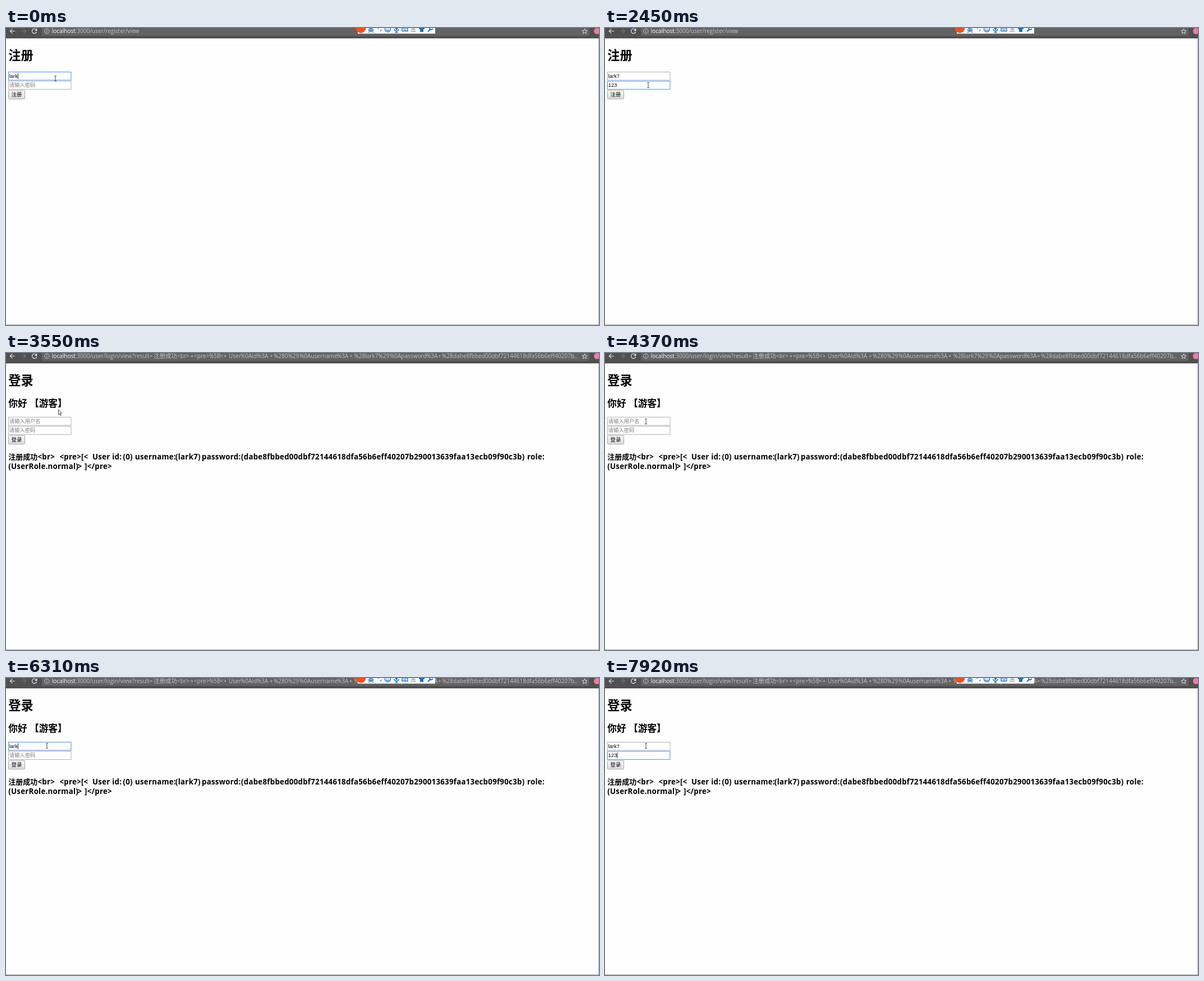
Recreate the animation shown at these times as an HTML page. Size 1057 px wide and 530 px high, loop 8000 ms.

```html
<!DOCTYPE html>
<html lang="zh-CN">
<head>
<meta charset="utf-8">
<title>注册</title>
<style>
html, body { margin: 0; width: 100%; height: 100%; overflow: hidden; background: #fefefe; }
svg { display: block; }
text { white-space: pre; }
.cjk { font-family: "Noto Sans CJK SC", "Noto Sans CJK", sans-serif; }
.url { font: 10.05px "Open Sans", sans-serif; fill: #c4c4c4; }
.url .cjk { font-size: 10.5px; }
.field { font: 9.3px "Liberation Sans", Arial, sans-serif; fill: #000; }
.hint { font-size: 9.3px; fill: #7c7c7c; }
.btn { font-size: 9.4px; fill: #000; }
.head { font-weight: 700; fill: #000; }
.result { font: 700 13.3px "Open Sans", sans-serif; letter-spacing: .25px; }
.line { fill: none; stroke-width: 1.2; }
</style>
</head>
<body>
<svg id="stage" width="1057" height="530" viewBox="0 0 1057 530">
  <defs>
    <linearGradient id="face" x1="0" y1="0" x2="0" y2="1">
      <stop offset="0" stop-color="#f7f7f7"/><stop offset="1" stop-color="#dcdcdc"/>
    </linearGradient>
    <linearGradient id="pressed" x1="0" y1="0" x2="0" y2="1">
      <stop offset="0" stop-color="#d4d4d4"/><stop offset="1" stop-color="#ededed"/>
    </linearGradient>
  </defs>
  <rect width="1057" height="530" fill="#fefefe"/>

  <g id="toolbar">
    <rect width="1057" height="18" fill="#505050"/>
    <rect y="17" width="1057" height="1.4" fill="#3c3c3c"/>
    <path d="M64 0H1040V12.5Q1040 14 1038.500 14H65.500Q64 14 64 12.500Z" fill="#636363"/>
    <path class="line" stroke="#e6e6e6" d="M16 5.500H7.500M11.500 1.300L7.300 5.500L11.500 9.700"/>
    <path class="line" stroke="#757575" d="M26.500 5.500H35M31 1.300L35.200 5.500L31 9.700"/>
    <g id="reload">
      <path class="line" stroke="#e6e6e6" d="M53.600 2.800A4.100 4.100 0 1 0 54.600 6.500"/>
      <path fill="#e6e6e6" d="M55.400 .6V5H51Z"/>
    </g>
    <path id="stop" class="line" stroke="#f0f0f0" d="M46.700 1.700L54.300 9.300M54.300 1.700L46.700 9.300"/>
    <circle class="line" cx="72.800" cy="5.700" r="4.200" stroke="#c8c8c8" style="stroke-width:1"/>
    <path d="M72.800 5V8.200M72.800 3.200V4.200" stroke="#c8c8c8"/>
    <g id="address" class="url"></g>
    <path class="line" style="stroke-width:1" stroke="#dedede" d="M1031.500 1.300L1032.800 4.400L1036 4.600L1033.600 6.700L1034.400 9.900L1031.500 8.100L1028.600 9.900L1029.400 6.700L1027 4.600L1030.200 4.400Z"/>
    <circle cx="1053.500" cy="5.500" r="5.500" fill="#ee7d9f"/>
  </g>

  <g id="ime">
    <rect x="627" width="138" height="10" fill="#fbfdff"/>
    <circle cx="632.500" cy="0" r="9" fill="#f4501c"/>
    <text class="cjk" x="645" y="6.500" font-size="11" font-weight="700" fill="#1c70c4">英</text>
    <g fill="none" stroke="#1c70c4" stroke-width="1.400">
      <path d="M663.500 0V1.500M668.800 2.800Q669 4.500 667.200 5.800"/>
      <circle cx="680.500" cy="2" r="5"/>
      <path d="M677.800 3Q680.500 6 683.200 3M678.700 0V1M682.300 0V1"/>
      <path d="M692 1.500Q692 5.300 696 5.300T700 1.500M696 5.300V8M693.500 8H698.500"/>
      <rect x="706" y="-3" width="10" height="8.500"/>
      <path d="M707 1H715M708.500 3.500H713.500" stroke-width="1.100"/>
      <path d="M752 6.500L757 1.500" stroke-width="2.200"/>
      <path d="M756 -1.500A2.700 2.700 0 1 0 760.500 1" stroke-width="1.800"/>
    </g>
    <rect x="694" y="-4" width="4" height="7.500" rx="2" fill="#1c70c4"/>
    <path d="M723.500 0H728.500V2H730V4H722V2H723.500ZM721.500 5H730.500V7H721.500Z" fill="#b7bdc4"/>
    <path d="M736 -2H746V2H744V7H738V2H736Z" fill="#1c70c4"/>
  </g>

  <g id="page"></g>

  <path d="M1056.500 18V530M0 529.500H1057" stroke="#a9a9a9"/>
  <path id="beam" d="M-2 -4.500H-.6L0 -4L.6 -4.500H2M0 -4V4M-2 4.500H-.6L0 4L.6 4.500H2" fill="none" stroke="#333" stroke-width=".9"/>
  <path id="arrow" d="M.5 .5V9.300L2.500 7.500L3.900 10.900L5.300 10.300L3.900 7.100H6.300Z" fill="#fff" stroke="#222" stroke-width=".8"/>
</svg>
<script>
const LOOP = 8000;
const USER = "lark7", PASS = "123";
const HASH = "dabe8fbbed00dbf72144618dfa56b6eff40207b290013639faa13ecb09f90c3b";
const $ = id => document.getElementById(id);

// latest value of a [time, value...] list
const at = (list, t) => list.reduce((last, row) => row[0] <= t ? row : last);

function make(parent, tag, attrs, content = "") {
  const el = document.createElementNS("http://www.w3.org/2000/svg", tag);
  for (const k in attrs) el.setAttribute(k, attrs[k]);
  el.textContent = content;
  parent.append(el);
  return el;
}
const write = (g, x, y, s, cls = "", size) =>
  make(g, "text", { x, y, class: cls, ...(size && { "font-size": size }) }, s);
const show = (el, on) => el.setAttribute("visibility", on ? "inherit" : "hidden");

function makeField(g, y, hint) {
  const box = make(g, "rect", { x: 4.5, y: y + .5, width: 111.5, height: 14.5, fill: "#fff" });
  const ghost = write(g, 5.8, y + 10.8, hint, "cjk hint");
  const value = write(g, 5.8, y + 10.9, "", "field");
  const caret = make(g, "rect", { y: y + 2.5, width: .9, height: 10.5, fill: "#111" });
  return (str, focus, blink) => {
    box.setAttribute("stroke", focus ? "#4b8df0" : "#b2b2b2");
    if (value.textContent !== str) value.textContent = str;
    show(ghost, !str);
    show(caret, focus && blink);
    caret.setAttribute("x", 5.9 + (str ? value.getComputedTextLength() : 0));
  };
}

function makeButton(g, y, label) {
  const box = make(g, "rect", { x: 4.5, y: y + .5, width: 29, height: 15.5, rx: 1 });
  write(g, 9.6, y + 11.6, label, "cjk btn");
  return mode => {
    box.setAttribute("fill", mode === "down" ? "url(#pressed)" : "url(#face)");
    box.setAttribute("stroke", mode ? "#858585" : "#a8a8a8");
  };
}

function makePage(title, top) {
  const g = make($("page"), "g", {});
  write(g, 4.3, 57.4, title, "cjk head", 22.2);
  return {
    g,
    name: makeField(g, top, "请输入用户名"),
    pass: makeField(g, top + 16.4, "请输入密码"),
    button: makeButton(g, top + 32.7, title)
  };
}

const signup = makePage("注册", 78);
const login = makePage("登录", 114);
write(login.g, 4.3, 95.8, "你好", "cjk head", 16.7);
write(login.g, 42, 95.8, "【游客】", "cjk head", 16.7);

write(login.g, 4.3, 190, "注册成功", "cjk head", 13);
[[56.5, "<br>"], [95.5, "<pre>[<"], [154, "User id:"], [208.5, "(0)"], [230, "username:"],
 [302, `(${USER})`], [349, "password:"], [419, `(${HASH})`], [929, "role:"]]
  .forEach(([x, s]) => write(login.g, x, 190, s, "result"));
[[4.3, "(UserRole.normal)"], [127.5, ">"], [140, "]</pre>"]]
  .forEach(([x, s]) => write(login.g, x, 207, s, "result"));

const bar = $("address");
const urlPart = (g, x, s, cls) => write(g, x, 9, s, cls);
urlPart(bar, 81.7, "localhost").setAttribute("fill", "#fff");
bar.firstChild.style.fill = "#fff";
const signupUrl = make(bar, "g", {}), loginUrl = make(bar, "g", {});
urlPart(signupUrl, 123.5, ":3000/user/register/view");
urlPart(loginUrl, 123.5, ":3000/user/login/view?result=");
urlPart(loginUrl, 263, "注册成功", "cjk");
[[305, "<br>"], [328.5, "+"], [335, "<pre>"], [362, "%5B"], [382, "<+"], [397, "User"],
 [418, "%0Aid%3A"], [470, "+"], [477, "%280%29"], [523, "%0Ausername"], [590, "%3A"],
 [612, "+"], [620.5, `%28${USER}%29`], [684, "%0Apassword"], [749, "%3A"], [770, "+"],
 [777, "%28"], [797, HASH.slice(0, 39)], [1011, "..."]]
  .forEach(([x, s]) => urlPart(loginUrl, x, s));

// typed length of each field
const signupName = [[0, 4], [530, 5]];
const signupPass = [[0, 0], [1550, 1], [1700, 2], [1980, 3]];
const loginName = [[0, 0], [5790, 1], [5910, 2], [6060, 3], [6310, 4], [6890, 5]];
const loginPass = [[0, 0], [7770, 1], [7920, 3]];

const focus = [[0, "name"], [840, "pass"], [2880, ""], [5090, "name"], [7180, "pass"]];
const caretOn = [[0, true], [1400, false], [1550, true], [2450, false], [5090, true], [5520, false], [5790, true]];
const press = [[0, ""], [2600, "hover"], [2880, "down"], [3120, "hover"], [3270, ""]];
const pointer = [
  [0, "beam", 88, 90], [1400, "beam", 88, 91], [2450, "beam", 77, 102],
  [2600, "arrow", 24, 118], [3120, "arrow", 26, 126], [3270, "arrow", 100, 172],
  [3400, "arrow", 120, 153.5], [3550, "arrow", 93, 100.5], [3670, "arrow", 87, 95.5],
  [3950, "arrow", 81, 110], [4100, "beam", 78, 126], [4230, "beam", 73, 127],
  [4370, "beam", 73, 122], [4500, "beam", 74, 118.7], [5520, "beam", 73, 120],
  [5650, "beam", 73, 122], [5790, "beam", 73, 121]
];

function draw(t) {
  const done = t >= 3550;
  const page = done ? login : signup;
  show(signup.g, !done);
  show(login.g, done);
  show(signupUrl, !done);
  show(loginUrl, done);

  const loading = t >= 3000 && !done;
  show($("stop"), loading);
  show($("reload"), !loading);
  show($("ime"), t < 3000 || t >= 5090);

  const active = at(focus, t)[1], blink = at(caretOn, t)[1];
  page.name(USER.slice(0, at(done ? loginName : signupName, t)[1]), active === "name", blink);
  page.pass(PASS.slice(0, at(done ? loginPass : signupPass, t)[1]), active === "pass", blink);
  page.button(at(press, t)[1]);

  const [, kind, x, y] = at(pointer, t);
  for (const id of ["beam", "arrow"]) show($(id), id === kind);
  $(kind).setAttribute("transform", `translate(${x} ${y})`);
}

const start = performance.now();
function tick() {
  draw((performance.now() - start) % LOOP);
  requestAnimationFrame(tick);
}
tick();
</script>
</body>
</html>
```
